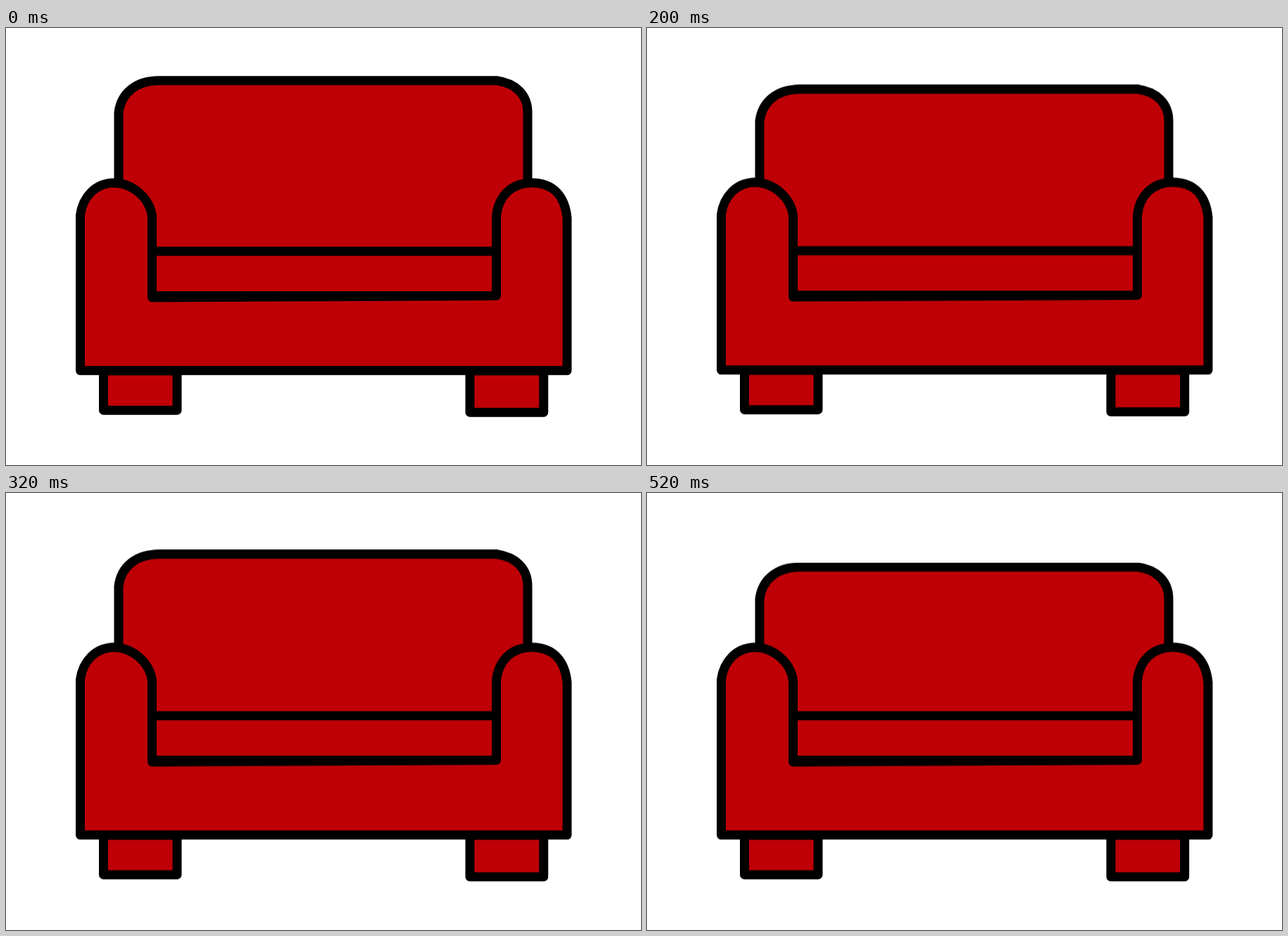
Animation, 902 px wide and 621 px high, one loop 0.6 s. Source, as an HTML page:

```html
<!DOCTYPE html>
<html lang="en">
<head>
<meta charset="utf-8">
<title>Sofa</title>
<style>
  html, body { margin: 0; width: 100%; height: 100%; overflow: hidden; background: #fff; }
  svg { display: block; width: 902px; height: 621px; }
  path { fill: #be0006; stroke: #000; stroke-width: 13; stroke-linejoin: round; stroke-linecap: round; }

  /* The back sinks in hard steps while the base settles once. */
  .back { animation: sink 600ms step-end infinite; }
  .base { animation: settle 600ms step-end infinite; }
  @keyframes sink {
    0% { transform: translateY(0); }
    33.3333% { transform: translateY(12.2px); }
    66.6667% { transform: translateY(30.5px); }
  }
  @keyframes settle {
    0% { transform: translateY(0); }
    33.3333%, 100% { transform: translateY(-0.8px); }
  }
</style>
</head>
<body>
<svg viewBox="0 0 902 621">
  <path class="back" d="M160 320V120C163.500 93 184 75 217 74.800H697C724 78.500 741 95 741 120V320Z"/>
  <g class="base">
    <path d="M207.500 317.200H696.500V380.500H207.500Z"/>
    <path d="M138.500 487H243V543.200H138.500Z"/>
    <path d="M659 487H763.700V546.200H659Z"/>
    <path d="M105.500 486.800V266C109 240 127 220 154 220C181 221 204 242 207.500 267V383L696.500 380.500V268C699 240 717 220 747 220C778 220 794 240 797 270V486.800Z"/>
  </g>
</svg>
</body>
</html>
```
